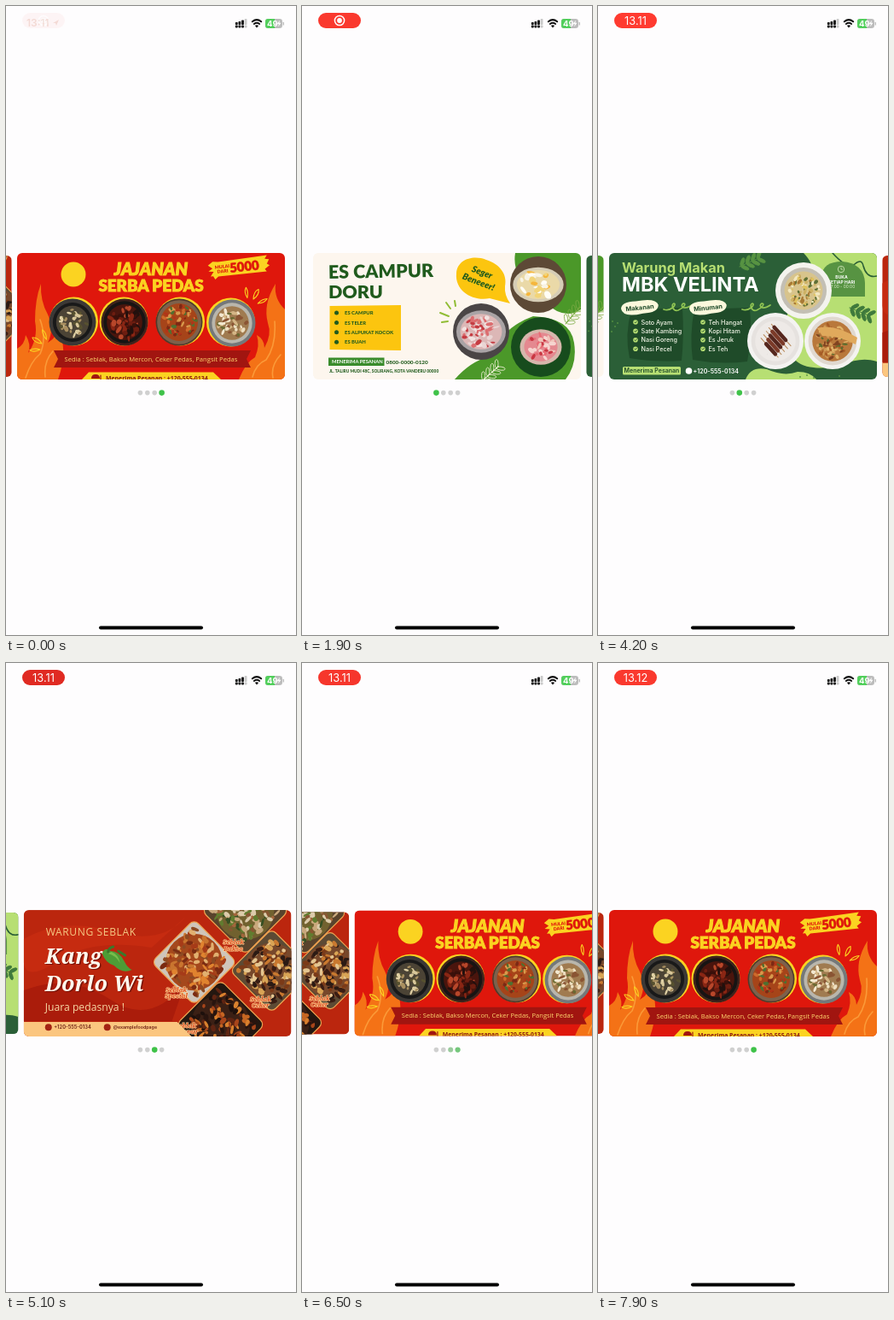
Recreate the animation shown at these times as an HTML page. Size 340 px wide and 736 px high, loop 8 s.

```html
<!DOCTYPE html>
<html lang="id">
<head>
<meta charset="utf-8">
<title>Food banner carousel</title>
<style>
html, body { margin: 0; width: 100%; height: 100%; overflow: hidden; background: #fefdfe; }
svg { display: block; width: 340px; height: 736px; }
</style>
</head>
<body>
<svg id="stage" viewBox="0 0 340 736"></svg>
<script>
const INTER = 'Inter, sans-serif', LATO = 'Lato, sans-serif',
      OPEN = "'Open Sans', sans-serif", SERIF = "'Noto Serif', serif";

// --- drawing helpers -------------------------------------------------
const text = (x, y, size, fill, str, font = INTER, weight = 400, extra = '') =>
  `<text x="${x}" y="${y}" font-size="${size}" fill="${fill}" font-family="${font}" font-weight="${weight}" ${extra}>${str}</text>`;
const mid = 'text-anchor="middle"';
const circle = (x, y, r, fill, extra = '') => `<circle cx="${x}" cy="${y}" r="${r}" fill="${fill}" ${extra}/>`;
const rect = (x, y, w, h, fill, rx = 0, extra = '') =>
  `<rect x="${x}" y="${y}" width="${w}" height="${h}" rx="${rx}" fill="${fill}" ${extra}/>`;
const shape = (d, fill, extra = '') => `<path d="${d}" fill="${fill}" ${extra}/>`;
const line = (d, stroke, w = 1.5) =>
  `<path d="${d}" fill="none" stroke="${stroke}" stroke-width="${w}" stroke-linecap="round" stroke-linejoin="round"/>`;
const move = (x, y, angle, body) => `<g transform="translate(${x} ${y}) rotate(${angle})">${body}</g>`;

function random(seed) {
  return () => (seed = (seed * 16807) % 2147483647) / 2147483647;
}

function blobs(seed, count, tones, size, place) {
  const rnd = random(seed * 7919 + 17);
  rnd();
  let out = '';
  for (let i = 0; i < count; i++) {
    const [x, y] = place(rnd), rx = size * (.5 + rnd()), ry = size * (.35 + rnd() * .5);
    out += `<ellipse rx="${rx.toFixed(1)}" ry="${ry.toFixed(1)}" fill="${tones[i % tones.length]}" ` +
      `transform="translate(${x.toFixed(1)} ${y.toFixed(1)}) rotate(${Math.floor(rnd() * 180)})"/>`;
  }
  return out;
}

// Round dish: backdrop, bowl, base and loose pieces; flat squashes the bowl
function dish(x, y, r, [back, bowl, base, ...tones], fill = .62, size = 3.5, count = 38, flat = 1) {
  const inDisc = rnd => {
    const a = rnd() * 6.283, d = Math.sqrt(rnd()) * r * (fill - .1);
    return [Math.cos(a) * d, Math.sin(a) * d];
  };
  return move(x, y, 0, circle(0, 0, r, back) + `<g transform="scale(1 ${flat})">` +
    circle(0, 0, r * (fill + .14), bowl) + circle(0, 0, r * fill, base) +
    blobs(x + y, count, tones, size, inDisc) + '</g>');
}

// Diamond-framed dish
function diamond(x, y, half, [back, base, ...tones]) {
  const s = half * 1.414, h = s / 2, span = s - 13;
  return move(x, y, 45, rect(-h, -h, s, s, back, 7, 'stroke="#efa552" stroke-width="1.2"') +
    circle(0, 0, h * .94, base) +
    blobs(x * 3 + y, 130, tones, 3.6, rnd => [(rnd() - .5) * span, (rnd() - .5) * span]));
}

const sprig = (x, y, angle, fill, outline) => {
  let out = line('M0 0H26', fill, 1);
  for (let i = 0; i < 4; i++)
    for (const side of [-1, 1])
      out += `<ellipse cx="5" cy="0" rx="5" ry="2" fill="${outline ? 'none' : fill}" stroke="${fill}" ` +
        `stroke-width=".8" transform="translate(${2 + i * 7} 0) rotate(${side * 48})"/>`;
  return move(x, y, angle, out);
};
const rays = (x, y, angle, color) => move(x, y, angle,
  line('M0 0Q-4-8 0-13Q4-8 0 0M7 2Q9-5 14-8Q14-2 7 2M-7 2Q-9-5-14-8Q-14-2-7 2', color, 1.1));
const curl = (x, y, color) => move(x, y, 0,
  line('M0 2C8 5 16-4 12-5C8-4 11 5 17 3C24 0 27-5 23-5C19-3 22 4 33-3', color, 1.7));

// --- banners (314 x 148) ---------------------------------------------
function iceBanner() {
  const dark = '#205b1d', leaf = '#4b9829';
  const items = ['ES CAMPUR', 'ES TELER', 'ES ALPUKAT KOCOK', 'ES BUAH'];
  return rect(0, 0, 314, 148, '#fdf6ee') +
    shape('M237 0Q234 18 246 37Q268 58 286 68Q301 75 314 66V0Z', leaf) +
    shape('M166 148Q184 127 207 121Q222 87 258 74Q302 76 306 105Q310 130 296 148Z', leaf) +
    text(18, 29, 21.5, dark, 'ES CAMPUR', LATO, 900, 'transform="rotate(-1 80 29)"') +
    text(18, 53, 21.5, dark, 'DORU', LATO, 900) +
    shape('M19.5 62L103 61V114L19.5 113Z', '#fcc50f') +
    items.map((s, i) => circle(27.5, 70 + i * 11.4, 2.5, dark) +
      text(37, 72.2 + i * 11.4, 5.9, dark, s, LATO, 800)).join('') +
    rect(18, 122.5, 65.5, 9.5, '#3a8c2c') +
    text(22, 129.4, 5.8, '#fff', 'MENERIMA PESANAN', LATO, 700) +
    text(85.5, 129.6, 6.4, dark, '0800-0000-0120', LATO, 800) +
    text(19, 139.6, 4.8, dark, 'JL. TALIRU MUDI 48C, SOLIRANG, KOTA VANDERU 00000', LATO, 800) +
    shape('M168 24C169 7 188 2 203 8C219 13 228 25 225 39Q224 49 231 59Q218 56 207 53C188 57 166 45 168 24Z', '#fcc50f') +
    move(197, 26, 21, text(0, 0, 10.5, dark, 'Seger', LATO, 900, mid + ' font-style="italic"') +
      text(0, 12, 10.5, dark, 'Beneeer!', LATO, 900, mid + ' font-style="italic"')) +
    line('M156 58L161 65M149 70L159 74M151 81L158 80M166 56L167 62', '#91bd36', 2) +
    dish(264, 37, 33, ['#5d4936', '#d6cdb6', '#ead9a8', '#fffdf5', '#f2d478', '#f8f3e4', '#f5b63d'], .76, 4.8, 22, .68) +
    dish(197, 92, 33, ['#4a4546', '#a9a3a5', '#dcb7b6', '#c53c43', '#f2e2e0', '#dc6d70', '#ead5d4'], .74, 3.4, 55, .85) +
    dish(267, 110, 35, ['#174c1d', '#d7b7ac', '#e48990', '#f6d4cf', '#c93743', '#e96c76', '#f0c4ba'], .56, 3.4, 32, .85) +
    sprig(198, 150, -42, '#f6f5de', true) + sprig(296, 83, -50, '#7cac45', true);
}

function stallBanner() {
  const dark = '#1f4b29', lime = '#b7df73', green = '#579342';
  const list = (x, items) => items.map((s, i) => circle(x, 81 + i * 10.4, 2.8, lime) +
    line(`M${x - 1.2} ${81 + i * 10.4}l1 1 1.6-2`, dark, .8) +
    text(x + 6.5, 83.6 + i * 10.4, 7.2, '#f4f8e9', s, INTER, 500)).join('');
  const tag = (x, s) => move(x, 64, -6, shape('M-22-1Q-21-9-4-8Q20-10 22-1Q21 8 3 7Q-21 10-22-1Z', '#fbf8dc') +
    text(0, 2.6, 7.4, dark, s, INTER, 700, mid));
  return rect(0, 0, 314, 148, '#2b5f37') +
    shape('M228 0C246 18 243 42 219 57C193 84 203 132 240 134C269 138 287 118 314 127V0Z', lime) +
    shape('M160 148Q166 132 185 136Q205 145 221 139Q236 139 243 148Z', lime) +
    shape('M26 67L86 64Q88 98 85 126Q52 128 24 123Q18 96 26 67Z', dark) +
    shape('M100 66L165 64Q168 97 162 127Q130 131 98 125Q94 96 100 66Z', dark) +
    sprig(153, 16, -24, green) + sprig(282, 64, 22, '#3f7a3c') +
    line('M262 0Q280 20 288 13T298 15Q302 30 314 27', '#2b5f37', 1.6) +
    text(15, 22.5, 16.4, lime, 'Warung Makan', INTER, 700) +
    text(15, 45, 23.5, '#fff', 'MBK VELINTA', INTER, 700) +
    curl(64, 64, '#91c553') + curl(156, 64, '#91c553') + tag(36, 'Makanan') + tag(116, 'Minuman') +
    list(31, ['Soto Ayam', 'Sate Kambing', 'Nasi Goreng', 'Nasi Pecel']) +
    list(110, ['Teh Hangat', 'Kopi Hitam', 'Es Jeruk', 'Es Teh']) +
    rect(16, 133, 68, 9.5, lime, 1.5) + text(50, 140.2, 7, dark, 'Menerima Pesanan', INTER, 600, mid) +
    circle(93.5, 138, 3.8, '#fff') + text(98.5, 140.6, 7.1, '#fff', '+120-555-0134', INTER, 600) +
    shape('M249 45V28Q250 10 273 10Q299 12 300 35V51H257Q249 51 249 45Z', green) +
    circle(272, 19, 3.7, 'none', 'stroke="#d9eac1" stroke-width=".8"') + line('M272 17v2.2h1.7', '#d9eac1', .7) +
    text(272.5, 30, 5, '#fff', 'BUKA', INTER, 700, mid) + text(272.5, 35.8, 5, '#fff', 'SETIAP HARI', INTER, 700, mid) +
    text(272.5, 41.4, 4.8, '#e1efcf', '07:00 - 00:00', INTER, 400, mid) +
    dish(228, 44, 33, ['#f4f3ee', '#c3bfb4', '#d8c48c', '#dfc25e', '#5f7036', '#f3e8c0', '#a97a35', '#cdb163'], .68, 2.4, 80) +
    dish(195, 103, 33, ['#f4f3f1', '#e6e2df', '#eeeae7', '#e6e2df'], .72, 1, 4) +
    move(195, 102, 48, [-9, -4, 1, 6, 11].map((y, i) =>
      line(`M${i - 17} ${y}H17`, '#b98a5a', 1) + line(`M${i * 2 - 12} ${y}H${8 + i}`, i % 2 ? '#7b3a28' : '#56271e', 4.6)).join('')) +
    dish(262, 103, 33, ['#f4f3f0', '#e0d9d0', '#b9783b', '#a65c26', '#dfb267', '#814320', '#cf9a55', '#5f6d2e'], .72, 2.3, 85) +
    shape('M244 88Q262 82 291 99L289 107Q268 96 250 97Z', '#e0a95c') +
    [[4, 80], [7, 86], [3, 92], [10, 82], [224, 145], [232, 143], [270, 144], [240, 146]]
      .map(([x, y]) => circle(x, y, .9, green)).join('');
}

function seblakBanner() {
  const tag = (x, y, s) => ['Seblak', s].map((w, i) => text(x, y + i * 7.5, 7.4, '#d9441b', w, SERIF, 700,
    mid + ' font-style="italic" stroke="#ffdf9f" stroke-width="1.2" paint-order="stroke"')).join('');
  const name = (y, s) => text(26.5, y + 1.5, 25.2, '#791408', s, SERIF, 800, 'font-style="italic"') +
    text(25, y, 25.2, '#fff8ed', s, SERIF, 800, 'font-style="italic"');
  return rect(0, 0, 314, 148, '#bb260e') +
    shape('M0 34Q46 8 104 25T190 8L150 44Q80 33 41 59T0 61Z', '#c62b10') +
    shape('M0 94Q54 73 102 105T190 84L174 130H0Z', '#aa1c0b') +
    diamond(260, 1, 51, ['#59432c', '#71612f', '#617c2f', '#c9a87c', '#885632', '#dccbab', '#364f22', '#a3663c']) +
    diamond(291, 71, 49, ['#5c4a34', '#77482b', '#d9a455', '#3a1d13', '#c9792f', '#7b3a18', '#e4c590', '#2b1a14']) +
    diamond(200, 61, 50, ['#cfc5ba', '#a5481c', '#c9752f', '#a63b18', '#e0832f', '#7b2b12', '#e2b070', '#8d4a22']) +
    diamond(231, 134, 52, ['#241710', '#3b2015', '#a8451a', '#d9812e', '#28140e', '#5f2412', '#1d100c', '#c66622']) +
    tag(246, 40, 'Bakso') + tag(179, 96, 'Special') + tag(278, 107, 'Ceker') + tag(190, 138, 'Campur') +
    text(26, 30, 12.1, '#f5c984', 'WARUNG SEBLAK', OPEN, 400, 'letter-spacing=".6"') +
    name(63, 'Kang') + name(95, 'Dorlo Wi') +
    shape('M92 51Q95 43 102 48Q112 48 118 60Q122 68 127 70Q116 75 106 65Q96 62 92 51Z', '#4d9c36') +
    shape('M103 49Q111 52 113 62Q108 53 99 51Z', '#78bd4b') + line('M99 49Q100 44 105 43M111 48L119 53', '#39792b', 3) +
    text(25, 118, 12.2, '#f7d8a5', 'Juara pedasnya !', OPEN, 400) +
    shape('M0 131H180L197 148H0Z', '#fbc67f') +
    circle(29, 137.3, 4, '#a42313') + text(35.5, 139.3, 5.8, '#6f2115', '+120-555-0134', INTER, 600) +
    circle(98, 137.3, 4, '#a42313') + text(105, 139.3, 5.3, '#6f2115', '@examplefoodpage', INTER, 600);
}

function spicyBanner() {
  const yellow = '#fbd321', red = '#df170c', flame = '#f47216';
  const ring = (x, y, dx, tones, fill, size, count) =>
    circle(x + dx, y - 1, 28.5, yellow) + dish(x, y, 27.5, tones, fill, size, count);
  return rect(0, 0, 314, 148, red) +
    shape('M0 148V112Q9 107 10 96Q17 107 13 117Q25 100 21 80Q21 54 28 36Q27 56 36 72Q44 89 36 105Q48 98 47 88Q61 111 48 148Z', flame) +
    shape('M260 148Q268 128 279 122Q285 108 281 96Q290 101 290 111Q299 95 294 82Q288 60 303 36Q301 54 314 66V148Z', flame) +
    line('M10 146Q16 127 27 118Q35 100 27 78M33 145Q31 127 42 115M276 145Q280 130 292 125Q304 108 302 80M300 146Q297 132 309 119', '#fb9a38', 1.6) +
    text(157, 26, 20.3, yellow, 'JAJANAN', LATO, 900, mid + ' font-style="italic" stroke="#fbd321" stroke-width="1"') +
    text(157, 45, 18.8, yellow, 'SERBA PEDAS', LATO, 900, mid + ' stroke="#fbd321" stroke-width=".9"') +
    circle(66, 25, 14.5, yellow) +
    move(260, 16, -6, shape('M-36-5L-30-9L-24-8L34-10L31-6L36-5L33 0L36 2L30 6L32 9L-25 9L-29 12L-31 8L-34 8L-30 3L-36 2L-31-1Z', yellow) +
      text(-19.5, -.2, 5.3, red, 'MULAI', LATO, 900, mid) + text(-19.5, 5.2, 5.3, red, 'DARI', LATO, 900, mid) +
      text(-11, 5.8, 15, red, '5000', LATO, 900, 'stroke="#df170c" stroke-width=".5"')) +
    ring(65, 81, 1.5, ['#3b3836', '#191919', '#4b4335', '#d8c799', '#a98f5f', '#e0d0a4', '#57512f'], .7, 3, 34) +
    ring(126, 81, -1, ['#40221c', '#171413', '#4a150d', '#8a2614', '#3a100a', '#b8472a', '#22100d', '#6d1d10'], .76, 3.5, 55) +
    ring(190, 81, 1.5, ['#4f3a2c', '#7d614b', '#a64419', '#cf6a2b', '#4f7030', '#7d2914', '#d89a4c', '#b23418'], .8, 2.4, 80) +
    ring(252, 82, -1.5, ['#74787a', '#b9b6ac', '#a07b50', '#eedfc0', '#d4b585', '#f3e8d0', '#8a5433', '#6a6a32'], .72, 3.2, 40) +
    rays(29, 106, -58, yellow) + rays(277, 54, 28, yellow) +
    shape('M43 114H274L269 124L274 134H43L48 124Z', '#a11510') +
    text(157, 126.8, 7.6, '#ffd66e', 'Sedia : Seblak, Bakso Mercon, Ceker Pedas, Pangsit Pedas', OPEN, 400, mid) +
    shape('M76 148L84 139.5H230L239 148Z', yellow) +
    shape('M87 147Q87 142 92 142T97 147Z', '#a11510') + line('M98 143v5', '#a11510', 1.2) +
    text(104, 148.8, 6.9, '#8b1710', 'Menerima Pesanan : +120-555-0134', OPEN, 700);
}

// --- stage -----------------------------------------------------------
const bars = [6.5, 7.5, 9, 10.5].map((h, i) => {
  const x = 268.9 + i * 3.6, fill = i < 3 ? '#111' : '#c9c9c9';
  return rect(x, 25.5 - h, 2.8, h - 3.6, fill, .7) + rect(x, 22.6, 2.8, 2.9, fill, .7);
}).join('');
const wifi = line('M288.8 18.3Q294 14 299.2 18.3', '#111', 2) + line('M290.8 21Q294 18.5 297.2 21', '#111', 1.9) +
  shape('M291.9 23.1Q294 21.6 296.1 23.1L294 25.4Z', '#111');
const battery = rect(304, 15, 20, 11, '#bcbcbc', 3.3) +
  shape('M307.3 15H315V26H307.3Q304 26 304 22.7V18.3Q304 15 307.3 15Z', '#52cf5c') +
  rect(324.7, 18.7, 1.3, 3.8, '#bcbcbc', .6) + text(306, 24.1, 9.6, '#fff', '49', INTER, 700) +
  shape('M320.9 16.8L317.8 21H319.8L319.2 24.2L322.5 19.8H320.4Z', '#fff');

const banners = [iceBanner, stallBanner, seblakBanner, spicyBanner];
const $ = id => document.getElementById(id);
$('stage').innerHTML =
  `<clipPath id="round">${rect(0, 0, 314, 148, '#000', 6)}</clipPath>` +
  banners.map((draw, i) => `<g id="card${i}"><g clip-path="url(#round)">${draw()}</g></g>`).join('') +
  banners.map((_, i) => circle(157.4 + i * 8.4, 452.6, 3, '#d0d0d0', `id="dot${i}"`)).join('') +
  `<g id="ghost">${text(24, 24, 12, '#f4e2dd', '13:11', INTER, 600)}${shape('M55 20L62 16L59 23L58 20Z', '#f4e2dd')}</g>` +
  `<g id="pill">${rect(19, 8, 50, 18, '#fff', 9, 'id="pillBox"')}` +
  `<g id="record">${circle(44, 17, 5.6, 'none', 'stroke="#fff" stroke-width="1.5"')}${circle(44, 17, 2.9, '#fff')}</g>` +
  text(44, 21.8, 12.8, '#fff', '13.11', INTER, 400, mid + ' id="clock"') + '</g>' +
  bars + wifi + battery + rect(109, 725.4, 122, 4, '#000', 2);

// --- motion ----------------------------------------------------------
const LOOP = 8000;
// Each swipe: start, duration, direction
const swipes = [[50, 500, -1], [612, 600, -1], [1250, 550, -1], [3350, 600, 1], [4511, 700, 1], [6091, 600, 1]];
const ramp = (t, start, length) => Math.min(1, Math.max(0, (t - start) / length));
const glide = x => 1 - (1 - x * x) ** 3;
const mix = (a, b, k) => `rgb(${a.map((v, i) => Math.round(v + (b[i] - v) * k))})`;

function render(t) {
  let page = 3, slot = 3;
  const lit = [0, 0, 0, 1];
  for (const [start, length, dir] of swipes) {
    page += dir * glide(ramp(t, start, length));
    // The dots cross-fade once the swipe passes halfway
    const k = ramp(t, start + length * .454, 220);
    lit[slot] -= k;
    lit[slot += dir] += k;
  }
  banners.forEach((_, i) => {
    const off = i - page, scale = 1 - .04 * Math.min(1, Math.abs(off));
    $('card' + i).setAttribute('transform',
      `translate(${170 + off * 314} 363) scale(${scale}) translate(-157 -74)`);
    $('dot' + i).setAttribute('fill', mix([208, 208, 208], [63, 194, 73], lit[i]));
    $('dot' + i).setAttribute('r', 2.8 + .5 * lit[i]);
  });

  const pulse = .5 + .5 * Math.cos((t - 150) * Math.PI / 1000);
  const swap = ramp(t, 3050, 300);
  $('pillBox').setAttribute('fill', mix([224, 42, 34], [255, 59, 48], pulse));
  $('pill').setAttribute('opacity', .04 + .96 * ramp(t, 80, 320));
  $('ghost').setAttribute('opacity', 1 - ramp(t, 0, 250));
  $('record').setAttribute('opacity', 1 - swap);
  $('clock').setAttribute('opacity', swap);
  $('clock').textContent = t < 7200 ? '13.11' : '13.12';
}

const begin = performance.now();
(function frame() {
  render((performance.now() - begin) % LOOP);
  requestAnimationFrame(frame);
})();
</script>
</body>
</html>
```
